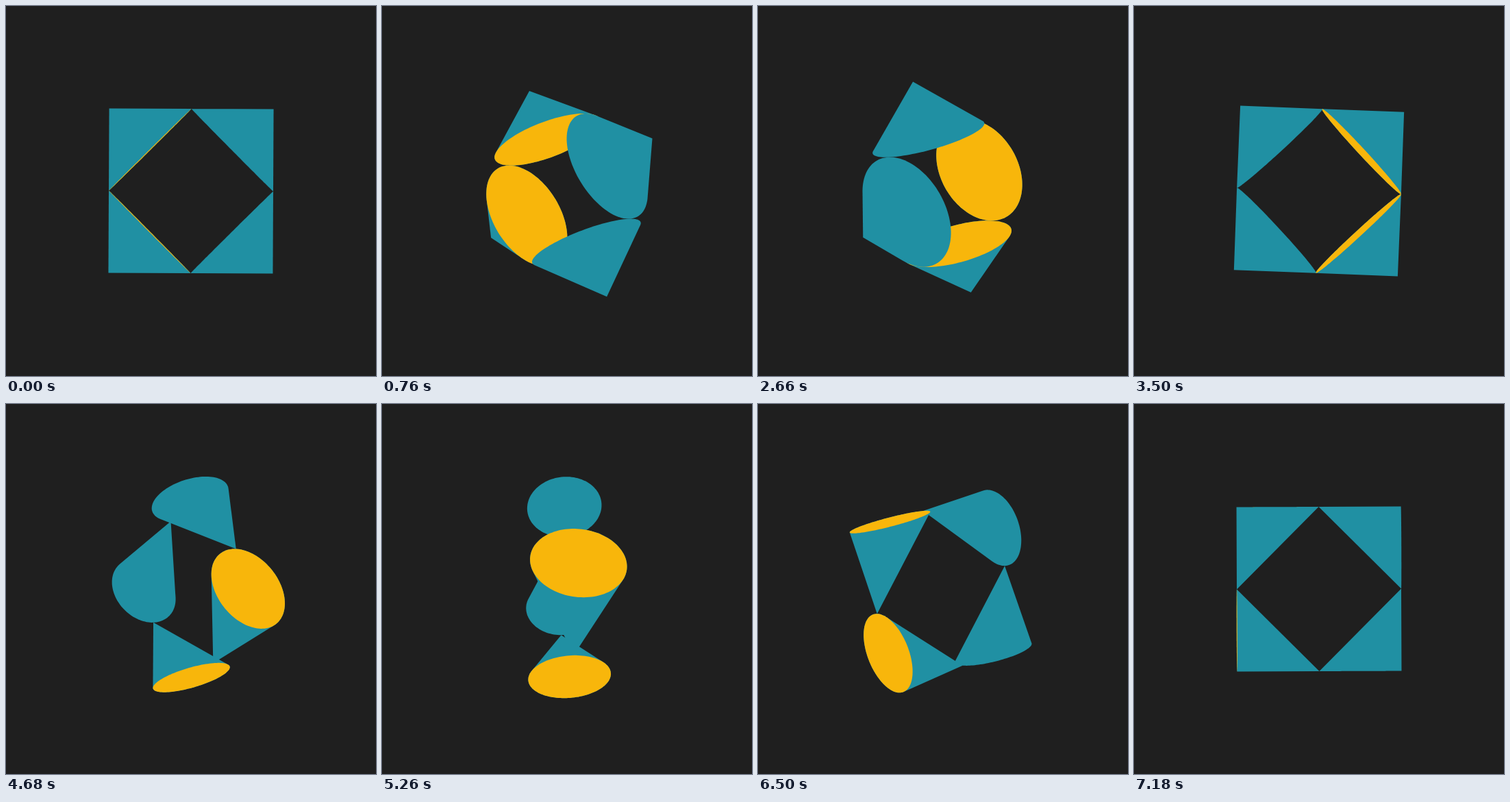
These frames come from a looping animation (540 by 540 pixels, 7.2 s). An HTML page with a canvas:

```html
<!DOCTYPE html>
<html lang="en">
<head>
<meta charset="utf-8">
<title>Turning cones</title>
<style>
  html, body { margin: 0; width: 100%; height: 100%; overflow: hidden; background: #1f1f1f; }
  canvas { display: block; width: 540px; height: 540px; }
</style>
</head>
<body>
<canvas id="stage" width="540" height="540"></canvas>
<script>
const ctx = document.getElementById('stage').getContext('2d');
const LOOP = 7200, SIZE = 540, HALF = 120, STEPS = 120;
const BG = '#1f1f1f', TEAL = '#2090a3', GOLD = '#f8b60b';
const TAU = Math.PI * 2;

const polar = (r, a) => [r * Math.cos(a), r * Math.sin(a)];

// Turn about the vertical axis; perspective is strongest when edge-on.
function makeView(flip) {
  const c = Math.cos(flip), s = Math.sin(flip), depth = s * s;
  return (x, y, z) => {
    const px = x * c - z * s, pz = x * s + z * c;
    const k = 1 / (1 + depth * (0.05 - 0.0016 * pz));
    return [SIZE / 2 + px * k, SIZE / 2 + y * k];
  };
}

const cross = (o, a, b) => (a[0] - o[0]) * (b[1] - o[1]) - (a[1] - o[1]) * (b[0] - o[0]);

function hull(points) {
  const sorted = points.slice().sort((a, b) => a[0] - b[0] || a[1] - b[1]);
  const chain = list => {
    const out = [];
    for (const p of list) {
      while (out.length > 1 && cross(out[out.length - 2], out[out.length - 1], p) <= 0) out.pop();
      out.push(p);
    }
    out.pop();
    return out;
  };
  return chain(sorted).concat(chain(sorted.reverse()));
}

function area(points) {
  return points.reduce((sum, p, i) => {
    const q = points[(i + 1) % points.length];
    return sum + p[0] * q[1] - q[0] * p[1];
  }, 0);
}

function fill(points, color) {
  ctx.fillStyle = color;
  ctx.beginPath();
  points.forEach(p => ctx.lineTo(p[0], p[1]));
  ctx.closePath();
  ctx.fill();
}

// Upright cones stand on the diamond's edges, slanted ones on the square's sides.
function makeCone(angle, slanted) {
  const corner = polar(HALF * Math.SQRT2, angle);
  if (!slanted) {
    return {
      apex: corner,
      center: [corner[0] / 2, corner[1] / 2],
      normal: [-corner[0], -corner[1]]
    };
  }
  const apex = polar(HALF, angle - Math.PI / 4);
  const rim = polar(HALF, angle + Math.PI / 4);
  return {
    apex,
    center: [(corner[0] + rim[0]) / 2, (corner[1] + rim[1]) / 2],
    normal: [corner[0] - apex[0], corner[1] - apex[1]]
  };
}

function drawCone({ apex, center, normal }, view) {
  const ux = -normal[1] / 2, uy = normal[0] / 2, r = Math.hypot(ux, uy);
  const base = [];
  for (let i = 0; i < STEPS; i++) {
    const [c, s] = polar(1, i / STEPS * TAU);
    base.push(view(center[0] + ux * c, center[1] + uy * c, r * s));
  }
  fill(hull([...base, view(apex[0], apex[1], 0)]), TEAL);
  if (area(base) > 0) fill(base, GOLD);
}

function draw(ms) {
  const phase = ((ms + 10) % LOOP) / LOOP;
  const flip = phase * TAU, spin = flip / 2;
  const view = makeView(flip);
  ctx.fillStyle = BG;
  ctx.fillRect(0, 0, SIZE, SIZE);
  [0, 1, 2, 3]
    .map(i => spin + Math.PI / 4 + i * Math.PI / 2)
    .sort((a, b) => Math.sin(flip) * (Math.cos(a) - Math.cos(b)))
    .forEach(a => drawCone(makeCone(a, phase >= 0.5), view));
}

const start = performance.now();
function tick() {
  draw(performance.now() - start);
  requestAnimationFrame(tick);
}
tick();
</script>
</body>
</html>
```
